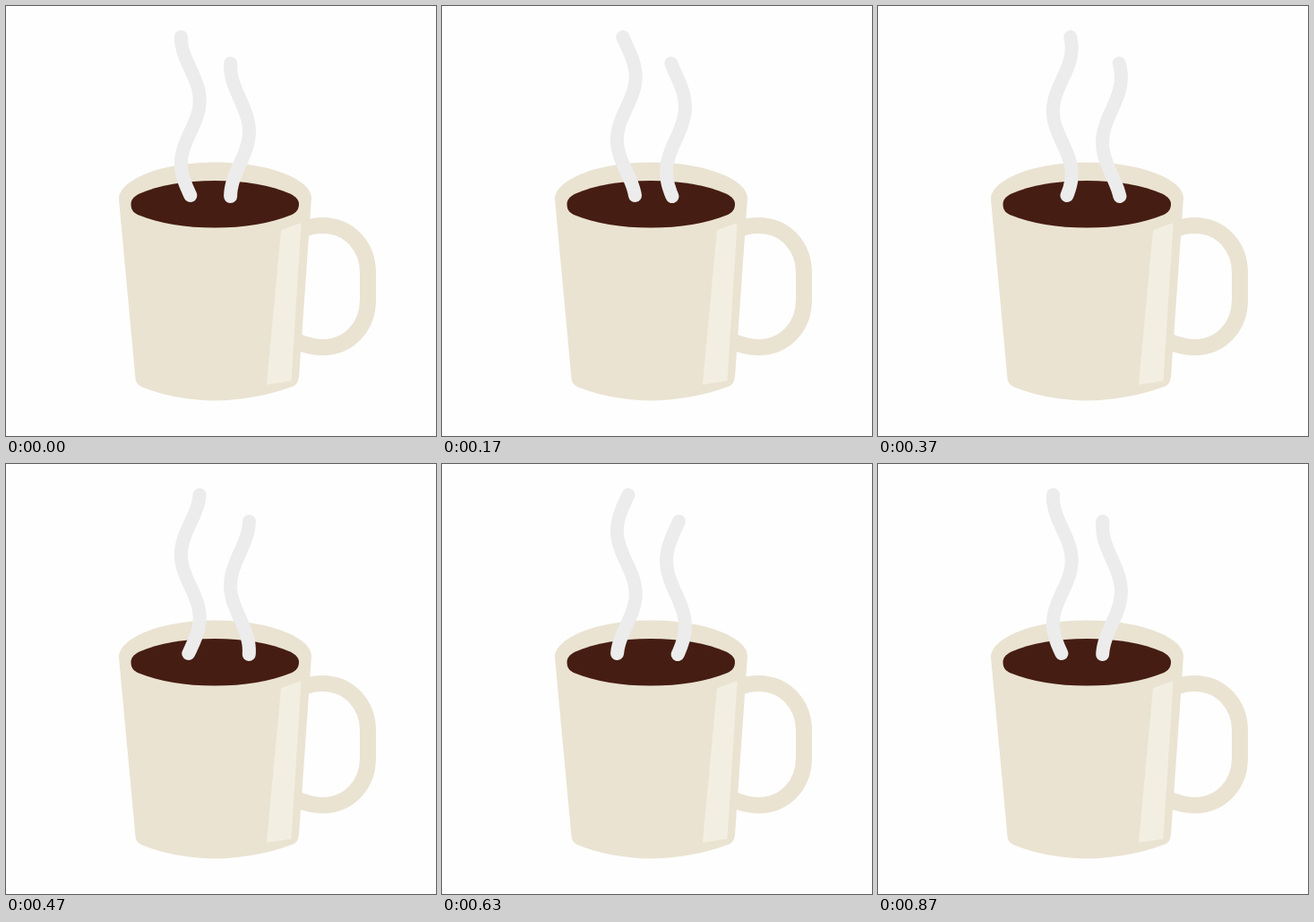
Animation of 480x480 px, one loop 0.91 s. Source, as an HTML page:

```html
<!DOCTYPE html>
<html lang="en">
<head>
<meta charset="utf-8">
<title>Steaming mug</title>
<style>
  html, body { margin: 0; width: 100%; height: 100%; overflow: hidden; background: #fefefe; }
  svg { display: block; width: 100vw; height: 100vh; }
  .mug { fill: #eae3d2; }
  .handle { fill: none; stroke: #eae3d2; stroke-width: 18; }
  .coffee { fill: #461d12; }
  .shine { fill: #f2efe2; stroke: #f2efe2; stroke-width: 2; stroke-linejoin: round; }
  .steam { fill: none; stroke: #ececec; stroke-width: 15; stroke-linecap: round; stroke-linejoin: round; }
</style>
</head>
<body>
<svg viewBox="0 0 480 480">
  <path class="handle" d="M332 249 Q342 245 353 245 C383 245 404 268 404 298 V328 C404 358 383 381 353 381 Q339 381 324 374"/>
  <path class="mug" d="M126 216 C126 195 170 174.5 233.5 174.5 C297 174.5 341 195 341 214 L327 414 Q326 423 319 425 Q278 440 233 440.5 Q188 440 151 425 Q145 422 144.5 416 Z"/>
  <path class="shine" d="M308 251 L328.5 243.5 L317.5 417.5 L292 421.5 Z"/>
  <path class="coffee" d="M139.5 221 C139.5 217 142 213 149 209.5 C170 200 200 195 233 195 C266 195 296 200 317 209.5 C324 213 327 217 327 221 C327 226 325 230 319 233 C294 243 266 247.5 233 247.5 C200 247.5 172 243 147 233 C141 230 139.5 226 139.5 221 Z"/>
  <path class="steam"/>
  <path class="steam"/>
</svg>
<script>
const LOOP = 910;
const SWAY = 10.4;
const RAD = Math.PI / 180;

// x: centre line, top/bottom: ends, phase: angle at the top, turn: degrees per pixel
const strands = [
  { x: 205.8, top: 34.5, bottom: 211.5, phase: -91, turn: 2.55 },
  { x: 261, top: 64, bottom: 212.5, phase: -98, turn: 2.47 }
];
const paths = document.querySelectorAll('.steam');

// Thirty poses a second, held on 0, 30 and 70 ms of every tenth
function poseAt(t) {
  const r = t % 100;
  return 3 * Math.floor(t / 100) + (r >= 30) + (r >= 70);
}

function wave({ x, top, bottom, phase, turn }, angle) {
  const points = [];
  const count = 60;
  for (let i = 0; i <= count; i++) {
    const y = top + (bottom - top) * i / count;
    const px = x + SWAY * Math.sin((angle + phase + turn * (y - top)) * RAD);
    points.push(px.toFixed(2) + ' ' + y.toFixed(2));
  }
  return 'M' + points.join('L');
}

function draw() {
  const angle = poseAt(performance.now() % LOOP) * 360 / 26.4;
  strands.forEach((s, i) => paths[i].setAttribute('d', wave(s, angle)));
  requestAnimationFrame(draw);
}
draw();
</script>
</body>
</html>
```
